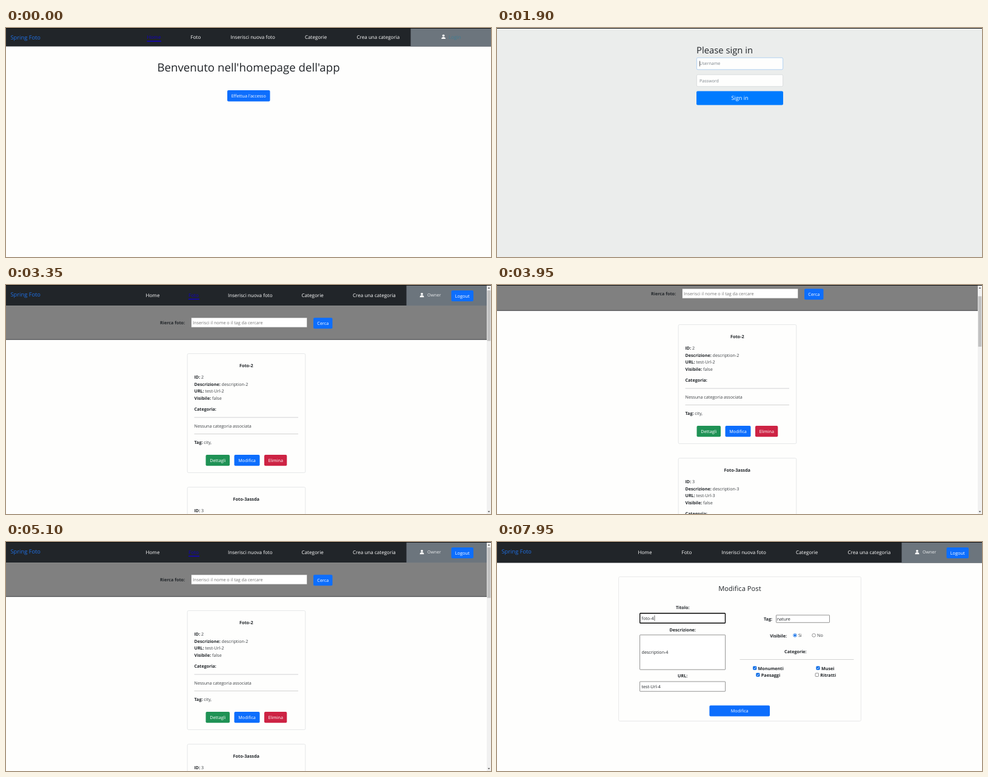
An HTML page that plays this animation: 800x379 px, repeating every 8 s.

```html
<!DOCTYPE html>
<html lang="it">
<head>
<meta charset="utf-8">
<title>Spring Foto</title>
<style>
  html, body { margin: 0; width: 100%; height: 100%; overflow: hidden; background: #fefefd; }
  svg { display: block; width: 100%; height: 100%; }
  text { font-family: "Open Sans", "Noto Sans", sans-serif; text-rendering: geometricPrecision; white-space: pre; }
</style>
</head>
<body>
<svg id="stage" viewBox="0 0 800 379" preserveAspectRatio="none"></svg>
<script>
const LOOP = 8000;
const BLUE = '#0d6efd', INK = '#212529', PAPER = '#fefefd';
const stage = document.getElementById('stage');

const rect = (x, y, w, h, fill, extra = '') =>
  `<rect x="${x}" y="${y}" width="${w}" height="${h}" fill="${fill}" ${extra}/>`;
const text = (x, y, s, size = 7.2, fill = INK, extra = '') =>
  `<text x="${x}" y="${y}" font-size="${size}" fill="${fill}" ${extra}>${s}</text>`;
const mid = (x, y, s, size, fill, extra = '') =>
  text(x, y, s, size, fill, 'text-anchor="middle" ' + extra);
const BOLD = 'font-weight="700"';
const box = (x, y, w, h, stroke = '#767676', r = 0.6, fill = '#fff') =>
  rect(x, y, w, h, fill, `stroke="${stroke}" stroke-width=".8" rx="${r}"`);
const button = (x, y, w, h, label, fill = BLUE, size = 7.2) =>
  rect(x, y, w, h, fill, 'rx="2"') + mid(x + w / 2, y + h / 2 + size * .36, label, size, '#fff');
const rule = (x1, x2, y) => rect(x1, y - .4, x2 - x1, .8, '#c8c8c9');
const topLine = rect(0, 0, 800, 1, '#0b0d0e');
const caret = (x, y, h = 9) => rect(x, y, .7, h, '#222');
const blink = (t, from) => (t - from) % 1000 < 500;

const LINKS = ['Home', 'Foto', 'Inserisci nuova foto', 'Categorie', 'Crea una categoria'];
const WIDE_X = [232.5, 304.5, 370.3, 493, 578.5];
const LIST_X = [230.5, 301, 366, 487.5, 572];

const person = (x, y) =>
  `<g fill="#fff"><circle cx="${x}" cy="${y - 1.9}" r="1.9"/>` +
  `<path d="M${x - 3.4} ${y + 3.6}q0-3.2 3.4-3.2t3.4 3.2z"/></g>`;

function navbar({ xs = WIDE_X, h, base, active = -1, hover = -1, logged }) {
  const shift = xs === LIST_X ? -7 : 0;
  let s = rect(0, 0, 800 + shift, h, INK) + rect(667.5 + shift, 0, 132.5, h, '#6c757d');
  s += topLine + text(7.5, 19.2, 'Spring Foto', 9.3, '#1f70e6');
  LINKS.forEach((label, i) => {
    const fill = i === active ? '#1200c4' : i === hover ? '#1c58b8' : '#fff';
    s += text(xs[i], base, label, 8.1, fill);
    if (i === active) s += rect(xs[i], base + 2.9, i ? 18 : 23.5, 1.5, '#1200c4');
  });
  if (!logged) return s + person(721.6, 14.5) + text(730, 18.2, 'Login', 8.1, '#3f7c92');
  return s + person(693 + shift, 16.7) + text(702 + shift, 19.4, 'Owner', 7.1, '#eceef0') +
    button(741.5 + shift, 9, 36.5, 18, 'Logout', BLUE, 7.4);
}

function home(t) {
  return navbar({ h: 30.5, base: 18.2, active: 0, hover: t >= 1600 ? 1 : -1 }) +
    mid(400, 72.4, "Benvenuto nell'homepage dell'app", 18.7) +
    button(365, 103, 70.5, 18.5, "Effettua l'accesso", BLUE, 7.16);
}

function signIn(t) {
  const onPass = t >= 2600;
  const name = 'owner'.slice(0, Math.max(0, Math.floor((t - 2050) / 50)));
  const dots = [2750, 2800, 2900, 2950].filter(k => t >= k).length;
  const edge = on => on ? '#a3c9f2' : '#d3d7da';
  let s = rect(0, 0, 800, 379, '#ebedec') + topLine;
  s += text(329, 42, 'Please sign in', 14.8, INK, 'font-weight="500"');
  s += box(329.4, 49.2, 142.2, 19.6, edge(!onPass), 2, PAPER);
  s += box(329.4, 77.2, 142.2, 19.6, edge(onPass), 2, PAPER);
  s += text(334, 61.3, name || 'Username', 7.1, name ? '#495057' : '#7b838a');
  if (!dots) s += text(334, 89.5, 'Password', 7.1, '#7b838a');
  for (let i = 0; i < dots; i++) s += `<circle cx="${335.3 + i * 3.1}" cy="87" r="1.05" fill="#343a40"/>`;
  if (onPass) { if (dots || blink(t, 2600)) s += caret(dots ? 334.1 + dots * 3.1 : 334, 82.3); }
  else if (name || !blink(t, 1400)) s += caret(334 + name.length * 4.2, 54.5);
  return s + button(329, 104.5, 143, 23, 'Sign in', '#007bff', 9.1);
}

function card(n, y) {
  const title = n === 3 ? 'Foto-3assda' : n === 4 ? 'foto-4' : 'Foto-' + n;
  const row = (dy, label, value = '') =>
    text(310.5, y + dy, `<tspan ${BOLD} fill="${INK}">${label}:</tspan> ${value}`, 7.15, '#3a3e42');
  return box(299.2, y, 194.6, 197, '#dfe1e2', 2, PAPER) +
    mid(396.3, y + 22.2, title, 7.3, INK, BOLD) +
    row(41.2, 'ID', n) + row(52.9, 'Descrizione', 'description-' + n) +
    row(64.5, 'URL', 'test-Url-' + n) + row(76.2, 'Visibile', 'false') +
    row(94.8, 'Categoria') + rule(310.5, 482, y + 105.5) +
    text(310.5, y + 122.4, n === 4 ? 'Musei' : 'Nessuna categoria associata', 7.15, '#3a3e42') +
    rule(310.5, 482, y + 133) + row(149.3, 'Tag', n === 4 ? 'nature' : 'city,') +
    button(329.5, y + 167.5, 39.5, 18.2, 'Dettagli', '#1f9255') +
    button(376.5, y + 167.5, 42, 18.2, 'Modifica') +
    button(426, y + 167.5, 37.3, 18.2, 'Elimina', '#cd2344');
}

// scroll keyframes: time, offset
const SCROLL = [[3900, 0], [3950, 48], [4300, 560], [4700, 0], [5700, 0], [6150, 442]];
function scrollAt(t) {
  if (t <= SCROLL[0][0]) return 0;
  for (let i = 1; i < SCROLL.length; i++) {
    const [a, from] = SCROLL[i - 1], [b, to] = SCROLL[i];
    if (t > b) continue;
    const k = (t - a) / (b - a);
    return from + (to - from) * k * k * (3 - 2 * k);
  }
  return 442;
}

function list(t) {
  const top = scrollAt(t);
  let s = navbar({ xs: LIST_X, h: 34.5, base: 19.8, active: 1, logged: true });
  s += rect(0, 34.5, 793, 56, '#808080') + rect(0, 89.8, 793, .9, '#3c3e40');
  s += text(254, 65, 'Rierca foto:', 7.2, INK, BOLD) + box(305.4, 54, 191.4, 16.2) +
    text(308, 64.9, 'Inserisci il nome o il tag da cercare', 7.24, '#757575') +
    button(507, 54.3, 31.5, 18, 'Cerca');
  for (let n = 2; n <= 8; n++) s += card(n, 113.6 + (n - 2) * 221);
  return `<g transform="translate(0 ${-top.toFixed(2)})">${s}</g>` + rect(0, 0, 793, 1, '#0b0d0e') +
    rect(793, 0, 7, 379, '#f1f1f1') + rect(793.7, 9 + top * .2, 5.6, 83.5, '#c1c1c1') +
    '<path d="M794.7 6l1.8-2.4 1.8 2.4z" fill="#606060"/><path d="M794.7 374l1.8 2.4 1.8-2.4z" fill="#606060"/>' +
    rect(793, 0, 7, 1, '#0b0d0e');
}

const check = (x, y, label, on) =>
  box(x, y, 5.4, 5.4, on ? '#0b6be6' : '#767676', .8, on ? '#0b6be6' : '#fff') +
  (on ? `<path d="M${x + 1.1} ${y + 2.8}l1.2 1.2 2.1-2.7" fill="none" stroke="#fff" stroke-width=".9"/>` : '') +
  text(x + 8.1, y + 5.8, label, 7.2, INK, BOLD);
const radio = (x, label, on) =>
  `<circle cx="${x}" cy="154.4" r="2.8" fill="#fff" stroke="${on ? '#0b6be6' : '#767676'}" stroke-width=".8"/>` +
  (on ? `<circle cx="${x}" cy="154.4" r="1.7" fill="#0b6be6"/>` : '') +
  text(x + 5.4, 157.2, label, 7.2, '#3a3e42');

function edit(t) {
  const shown = t >= 6600, focus = t >= 7650;
  const label = (y, s) => mid(306.2, y, s, 7.2, INK, BOLD);
  let s = navbar({ h: 34.5, base: 19.8, logged: true });
  s += box(200.6, 57.6, 399.8, 238.8, '#e2e3e4', 2, PAPER);
  s += mid(400.4, 80.7, 'Modifica Post', 11.2, INK, 'font-weight="500"');
  s += label(111, 'Titolo:') + box(235.6, 118, 141, 16.2);
  if (focus) s += rect(235.7, 118, 140.8, 16.2, 'none', 'stroke="#101010" stroke-width="1.4" rx="1"');
  s += text(238.5, 129, 'foto-4');
  if (focus && blink(t, 7650)) s += caret(259.6, 121.5);
  s += label(147.5, 'Descrizione:') + box(235.6, 153.8, 141, 57.4) + text(238.5, 185.4, 'description-4');
  s += label(223.9, 'URL:') + box(235.6, 231, 141, 16.2) + text(238.5, 242, 'test-Url-4');
  s += text(440, 130, 'Tag:', 7.2, INK, BOLD) + box(460.5, 121, 88, 12.3) + text(461.7, 130, 'nature');
  s += text(450.2, 157.5, 'Visibile:', 7.2, INK, BOLD) + radio(491.5, 'Si', shown) + radio(522.6, 'No', !shown);
  s += mid(492.4, 184.4, 'Categorie:', 7.2, INK, BOLD) + rule(400.5, 588.5, 194.6);
  s += check(422.5, 205.9, 'Monumenti', t >= 6950) + check(526.8, 205.9, 'Musei', true) +
    check(427.7, 217.1, 'Paesaggi', t >= 7150) + check(525.1, 217.1, 'Ritratti', false);
  return s + button(350.4, 270.6, 99.6, 18, 'Modifica');
}

const SCENES = [[1750, home], [3150, signIn], [6300, list], [LOOP, edit]];
let last = '';
function frame(now) {
  const t = Math.floor(now % LOOP / 50) * 50;
  const markup = rect(0, 0, 800, 379, PAPER) + SCENES.find(([end]) => t < end)[1](t);
  if (markup !== last) stage.innerHTML = last = markup;
  requestAnimationFrame(frame);
}
frame(performance.now());
</script>
</body>
</html>
```
